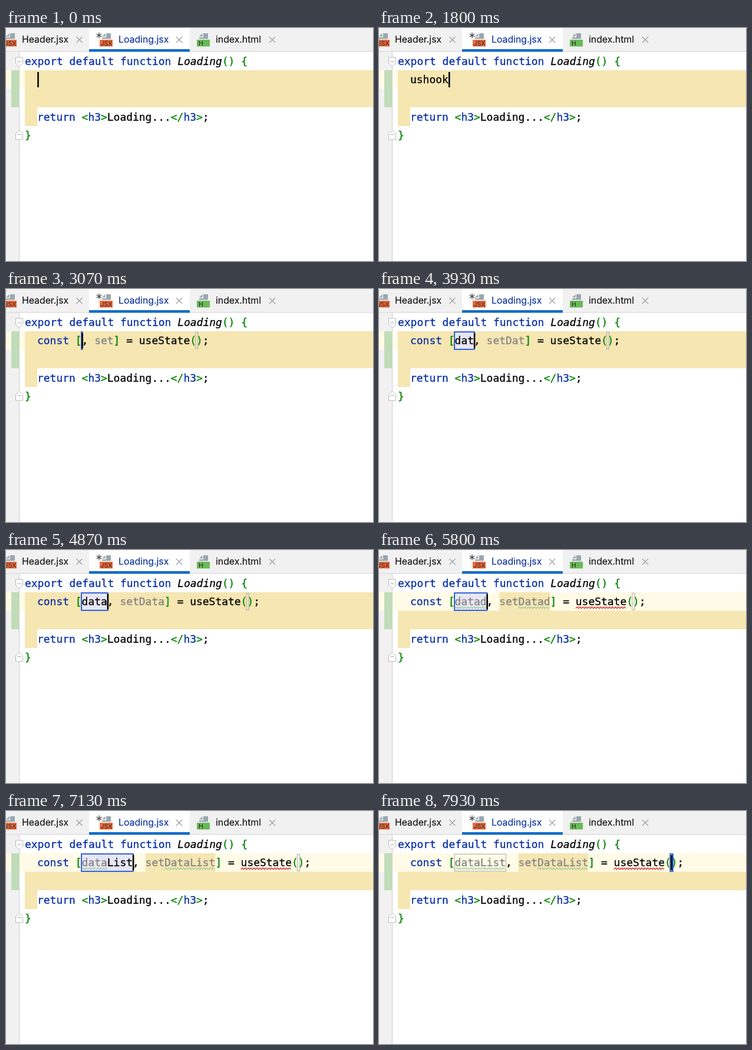
Recreate the animation shown at these times as an HTML page with a canvas. Size 623 by 397 pixels, loop 8000 ms.

```html
<!DOCTYPE html>
<html lang="en">
<head>
<meta charset="utf-8">
<title>Typing a state hook</title>
<style>
html, body { margin: 0; width: 100%; height: 100%; overflow: hidden; background: #fff; }
canvas { display: block; }
</style>
</head>
<body>
<canvas id="stage" width="623" height="397"></canvas>
<script>
const ctx = document.getElementById('stage').getContext('2d');
const LOOP = 8000, CELL = 10.8, INDENT = 53;
const MONO = '17.94px "DejaVu Sans Mono", monospace';
const UI = '15.8px Inter, sans-serif';
const C = {
  ink: '#080808', keyword: '#0a31a6', bracket: '#078507', unused: '#858585',
  block: '#f5e6b2', row: '#fffbe7', gutter: '#f1f1f1', tab: '#126dca', box: '#1750dc'
};

// Each entry holds from its time until the next one.
const HOOK = [[0, ''], [530, 'u'], [730, 'us'], [1000, 'ush'], [1200, 'usho'], [1400, 'ushoo'], [1600, 'ushook']];
const NAME = [[0, ''], [3130, 'd'], [3330, 'da'], [3600, 'dat'], [4130, 'data'], [4930, 'datad'],
  [6070, 'data'], [6270, 'dataL'], [6530, 'dataLi'], [6730, 'dataLis'], [6930, 'dataList']];
const POPUP = 2070, EXPAND = 2600, INSPECT = 5330, REINSPECT = 7330, JUMP = 7530;

const at = (steps, t) => steps.filter(s => s[0] <= t).pop()[1];
const col = n => INDENT + n * CELL;

function rect(x, y, w, h, color) {
  ctx.fillStyle = color;
  ctx.fillRect(x, y, w, h);
}

function text(s, x, y, color, font = UI, weight = .15) {
  ctx.font = font;
  ctx.fillStyle = ctx.strokeStyle = color;
  ctx.lineWidth = weight;
  ctx.fillText(s, x, y);
  ctx.strokeText(s, x, y);
}

function path(points, color, width = 1, fill) {
  ctx.beginPath();
  points.forEach(([x, y], i) => i ? ctx.lineTo(x, y) : ctx.moveTo(x, y));
  if (fill) {
    ctx.closePath();
    ctx.fillStyle = fill;
    ctx.fill();
  }
  if (!color) return;
  ctx.strokeStyle = color;
  ctx.lineWidth = width;
  ctx.stroke();
}

function frame(x, y, w, h, color, width, fill) {
  if (fill) rect(x, y, w, h, fill);
  ctx.strokeStyle = color;
  ctx.lineWidth = width;
  ctx.strokeRect(x, y, w, h);
}

function code(x, y, parts) {
  for (const [s, color, style = ''] of parts) {
    text(s, x, y, color, style + MONO, .35);
    x += s.length * CELL;
  }
}

function squiggle(x, w, color) {
  const points = [];
  for (let i = 0; i * 2.5 <= w; i++) points.push([x + i * 2.5, i % 2 ? 97 : 99.5]);
  path(points, color, 1.3);
}

function caret(x) {
  rect(x, 75, 2.6, 26, '#000');
}

function close(x) {
  path([[x - 5, 15], [x + 5, 25]], '#9b9fa3', 1.2);
  path([[x + 5, 15], [x - 5, 25]], '#9b9fa3', 1.2);
}

function fileIcon(x, color, label, dx) {
  path([[x + 4, 14.5], [x + 9.5, 9], [x + 9.5, 14.5]], null, 0, '#9aa7b0');
  path([[x + 11, 9], [x + 19, 9], [x + 19, 18.5], [x + 4, 18.5], [x + 4, 16], [x + 11, 16]], null, 0, '#9aa7b0');
  rect(x, 20, 22, 11.5, color);
  text(label, x + dx, 29.8, '#3b2a25', '10.5px Inter, sans-serif');
}

function tabs() {
  rect(0, 0, 623, 40, C.gutter);
  rect(141, 0, 171, 40, '#fff');
  rect(0, 39.5, 623, 1, '#d2d2d2');
  rect(141, 36, 171, 4.5, C.tab);
  fileIcon(-4, '#ed6b3b', 'JSX', 1.5);
  text('Header.jsx', 27, 25, '#111');
  close(124.5);
  fileIcon(159, '#ed6b3b', 'JSX', 1.5);
  for (let i = 0; i < 3; i++) {
    const a = Math.PI / 2 + i * Math.PI / 3, dx = 5 * Math.cos(a), dy = 5 * Math.sin(a);
    path([[158 - dx, 12.5 - dy], [158 + dx, 12.5 + dy]], '#333', 1.2);
  }
  text('Loading.jsx', 191, 25, '#08309c');
  close(294);
  fileIcon(324, '#68ba58', 'H', 3);
  text('index.html', 356, 25, '#111');
  close(452);
}

function fold(y, dir) {
  path([[16.5, y - 8 * dir], [28.5, y - 8 * dir], [28.5, y + 2 * dir], [22.5, y + 8 * dir],
    [16.5, y + 2 * dir], [16.5, y - 8 * dir]], '#b9b9b9', 1, '#fff');
  path([[19.5, y - .5], [25.5, y - .5]], '#a5a5a5');
}

function editor(inspected) {
  rect(0, 40.5, 22, 357, C.gutter);
  rect(0, 72, 623, 31.5, C.row);
  rect(32, inspected ? 103.5 : 72, 591, inspected ? 31.5 : 63, C.block);
  rect(32, 135, 21, 32, C.block);
  rect(9, 72, 13, 63, '#c0dcb8');
  rect(22, 40.5, 1, 357, '#d0d0d0');
  fold(58, 1);
  fold(182, -1);

  code(32, 63, [['export default function ', C.keyword], ['Loading', C.ink, 'italic '],
    ['()', C.bracket], [' ', C.ink], ['{', C.bracket]]);
  code(INDENT, 158, [['return ', C.keyword], ['<', C.bracket], ['h3', C.keyword], ['>', C.bracket],
    ['Loading...', C.ink], ['</', C.bracket], ['h3', C.keyword], ['>', C.bracket], [';', C.ink]]);
  code(32, 189, [['}', C.bracket]]);
}

function hookLine(t, inspected) {
  const name = at(NAME, t);
  const setter = 'set' + name.charAt(0).toUpperCase() + name.slice(1);
  const jumped = t >= JUMP;
  // Characters typed since the last inspection stay dark.
  const known = !inspected ? 0 : t >= REINSPECT ? name.length : t < 6070 ? 5 : 4;
  const nameX = col(7), setX = col(9 + name.length);
  const callX = setX + (setter.length + 4) * CELL, endX = callX + 9 * CELL;
  const nameW = name.length * CELL;

  if (inspected) rect(setX, 72, setter.length * CELL, 31.5, C.block);
  if (jumped) frame(nameX - .5, 73.5, nameW + 1, 29, '#b5b5b5', 1.2);
  else frame(nameX - .5, 73.2, nameW + 1.5, 29.6, C.box, 1.8, '#e8e6f5');

  code(INDENT, 94, [['const ', C.keyword], ['[', C.bracket], [name.slice(0, known), C.unused],
    [name.slice(known), C.ink], [', ', C.ink], [setter, C.unused], [']', C.bracket],
    [' = useState', C.ink], ['()', C.bracket], [';', C.ink]]);

  if (inspected) {
    squiggle(nameX, known * CELL, '#a3cf9c');
    squiggle(setX + 3 * CELL, nameW, '#a3cf9c');
    squiggle(callX, 8 * CELL, '#e0302c');
  }
  if (jumped) frame(endX - 1.5, 73.2, 4.5, 29.6, C.box, 1.8);
  else frame(endX - 1.3, 73.5, 4, 28.5, '#b5b5b5', 1.2);
  caret(jumped ? endX - .5 : nameX + nameW - .2);
}

function popup() {
  ctx.save();
  ctx.shadowColor = 'rgba(0,0,0,.4)';
  ctx.shadowBlur = 22;
  ctx.shadowOffsetY = 8;
  rect(44, 103, 600, 67, '#f3f3f3');
  ctx.restore();
  frame(44.5, 103.5, 600, 66.5, '#b8b8b8', 1);
  rect(45, 104, 578, 30, '#d8d8d8');
  code(INDENT, 124, [['ushook', '#1a68bd']]);
  code(572, 124, [['React', '#828282']]);

  const grey = '#666';
  text('Press', 60, 158, grey);
  path([[121, 147.5], [121, 153.5], [108, 153.5]], grey, 1.3);
  path([[112, 149.5], [108, 153.5], [112, 157.5]], grey, 1.3);
  text('to insert,', 127, 158, grey);
  path([[197, 153], [205.5, 153]], grey, 1.3);
  path([[202.5, 150], [205.5, 153], [202.5, 156]], grey, 1.3);
  path([[207.5, 149.5], [207.5, 156.5]], grey, 1.3);
  text('to replace', 213, 158, grey);
  text('Next Tip', 296, 158, '#1660b0');
}

function draw(t) {
  const inspected = t >= INSPECT;
  rect(0, 0, 623, 397, '#fff');
  editor(inspected);
  tabs();
  if (t >= EXPAND) {
    hookLine(t, inspected);
  } else {
    const typed = at(HOOK, t);
    code(INDENT, 94, [[typed, C.ink]]);
    caret(col(typed.length) + .2);
    if (t >= POPUP) popup();
  }
}

const start = performance.now();
function tick() {
  draw((performance.now() - start) % LOOP);
  requestAnimationFrame(tick);
}
tick();
</script>
</body>
</html>
```
